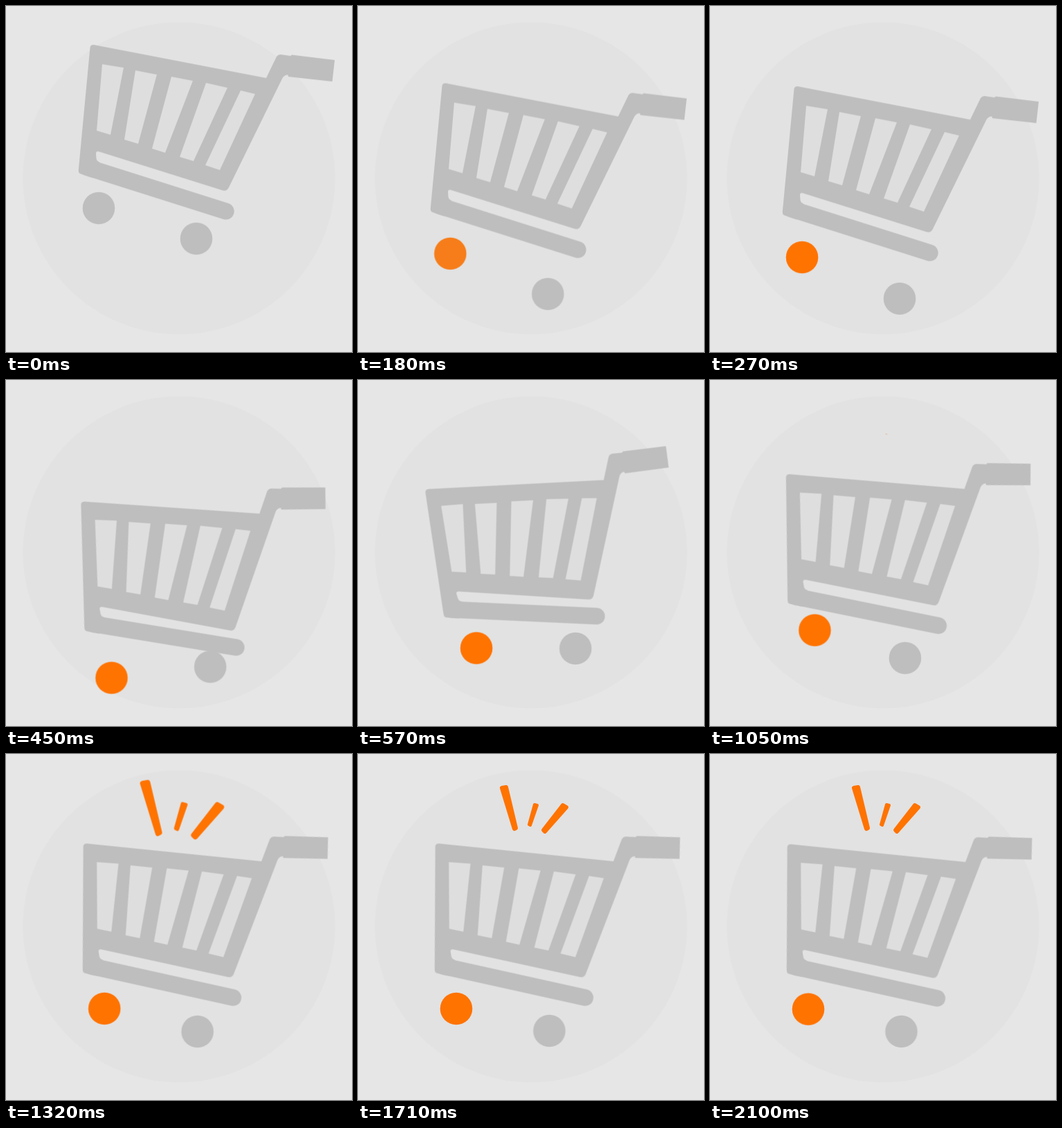
Recreate the animation shown at these times as an HTML page without scripts. Size 500x500 px, loop 2130 ms.

```html
<!DOCTYPE html>
<html lang="en">
<head>
<meta charset="utf-8">
<title>Shopping cart drop</title>
<style>
  :root {
    --loop: 2130ms;
    --fall: cubic-bezier(.33, 0, .67, .33);
    --land: cubic-bezier(.33, .38, .67, 1);
    --smooth: cubic-bezier(.333, 0, .667, 1);
  }
  html, body { margin: 0; width: 100%; height: 100%; overflow: hidden; background: #e6e6e6; }
  svg { display: block; width: 100vw; height: 100vh; }
  g, .bar, .left { animation: var(--loop) var(--smooth) infinite; }
  .metal { fill: #bebebe; }
  .gaps { fill: #dedede; }
  .bar {
    fill: none; stroke: #bebebe; stroke-width: 24; stroke-linecap: round;
    transform-origin: 112px 231px; animation-name: flex;
  }
  .drop { animation-name: drop; }
  .tilt { transform-origin: 250px 176px; animation-name: tilt; }
  .left { fill: #ff7300; animation-name: tint; }
  .lx { animation-name: lx; }
  .ly { animation-name: ly; }
  .rx { animation-name: rx; }
  .ry { animation-name: ry; }
  .sparks {
    fill: #ff7300; stroke: #ff7300; stroke-width: 6; stroke-linejoin: round;
    transform-origin: 255px 78px; animation-name: pop;
  }

  /* basket */
  @keyframes drop {
    0% { transform: translateY(0); animation-timing-function: var(--fall); }
    12.68% { transform: translateY(60px); animation-timing-function: var(--land); }
    19.01% { transform: translateY(109px); }
    30.05% { transform: translateY(58px); }
    46.01% { transform: translateY(67px); }
    61.03%, 80.28% { transform: translateY(62px); }
    98.59%, 100% { transform: translateY(63px); }
  }
  @keyframes tilt {
    0%, 13.62% { transform: rotate(0deg); }
    29.48% { transform: rotate(-15deg); animation-timing-function: cubic-bezier(.25, .05, .55, 1); }
    46.95% { transform: rotate(-6.2deg); }
    61.03%, 100% { transform: rotate(-5.1deg); }
  }
  @keyframes flex {
    0%, 14.79% { transform: rotate(0deg); }
    21.13% { transform: rotate(-1.3deg); }
    33.8% { transform: rotate(-.8deg); }
    46.95%, 100% { transform: rotate(0deg); }
  }

  /* left wheel */
  @keyframes tint {
    0% { fill: #bebebe; }
    11%, 100% { fill: #ff7300; }
  }
  @keyframes lx {
    0% { transform: translateX(0); }
    13.62% { transform: translateX(-1px); }
    29.11% { transform: translateX(39.5px); }
    46.95% { transform: translateX(18px); }
    63.38%, 100% { transform: translateX(8px); }
  }
  @keyframes ly {
    0% { transform: translateY(0); animation-timing-function: var(--fall); }
    12.68% { transform: translateY(71px); animation-timing-function: var(--land); }
    19.81% { transform: translateY(141px); }
    31.92% { transform: translateY(67px); }
    49.3% { transform: translateY(69.5px); }
    63.38%, 80.28% { transform: translateY(76px); }
    98.59%, 100% { transform: translateY(76.7px); }
  }

  /* right wheel */
  @keyframes rx {
    0% { transform: translateX(0); }
    13.62% { transform: translateX(-1px); }
    28.64% { transform: translateX(41px); }
    48.36% { transform: translateX(7px); }
    63.38%, 100% { transform: translateX(1.5px); }
  }
  @keyframes ry {
    0% { transform: translateY(0); animation-timing-function: var(--fall); }
    12.68% { transform: translateY(86.5px); animation-timing-function: ease-out; }
    14.79% { transform: translateY(97px); }
    30.99% { transform: translateY(43px); }
    53.99% { transform: translateY(68.5px); }
    65.73%, 80.28% { transform: translateY(64px); }
    98.59%, 100% { transform: translateY(65px); }
  }

  @keyframes pop {
    0%, 48.12% { transform: scale(0); }
    62.44% { transform: scale(1.23); }
    77.46%, 100% { transform: scale(1); }
  }
</style>
</head>
<body>
<svg viewBox="0 0 500 500">
  <circle cx="250" cy="249" r="225.5" fill="#e2e2e2"/>

  <g class="drop"><g class="tilt">
    <path class="bar" d="M118 233.2L317.7 296.5"/>
    <path class="metal" d="M121.5 60Q122 55.5 127 56L376 104L390.5 74Q392.5 70 397 70L411 72L413 70.5L475 78L471.5 109L408 102L407.5 99.5Q402 99 399 105L322 262Q319 268.5 312 266L135 210.5Q130 209 130 213L130.5 220Q131 224 135 225.5L125 248L108 242.6Q104.5 241.5 104.8 237Z"/>
    <path class="gaps" d="M139 84L170 89L151 186L131 180ZM187 93L218 99L191 199L171 193ZM239 102L270 108L230 212L211 206ZM289 111L320 118L271 224L251 218ZM339 122L360 127L309 237L288 230Z"/>
  </g></g>

  <g class="rx"><g class="ry"><circle class="metal" cx="275" cy="336" r="23.3"/></g></g>
  <g class="lx"><g class="ly"><circle class="left" cx="134" cy="292" r="23.3"/></g></g>

  <g class="sparks">
    <path d="M208 49L214 48L228 107L226 108Z"/>
    <path stroke-width="4" d="M255 73L259 74L249 103L247 102Z"/>
    <path d="M296 74L301 77L270 112L268 110Z"/>
  </g>
</svg>
</body>
</html>
```
